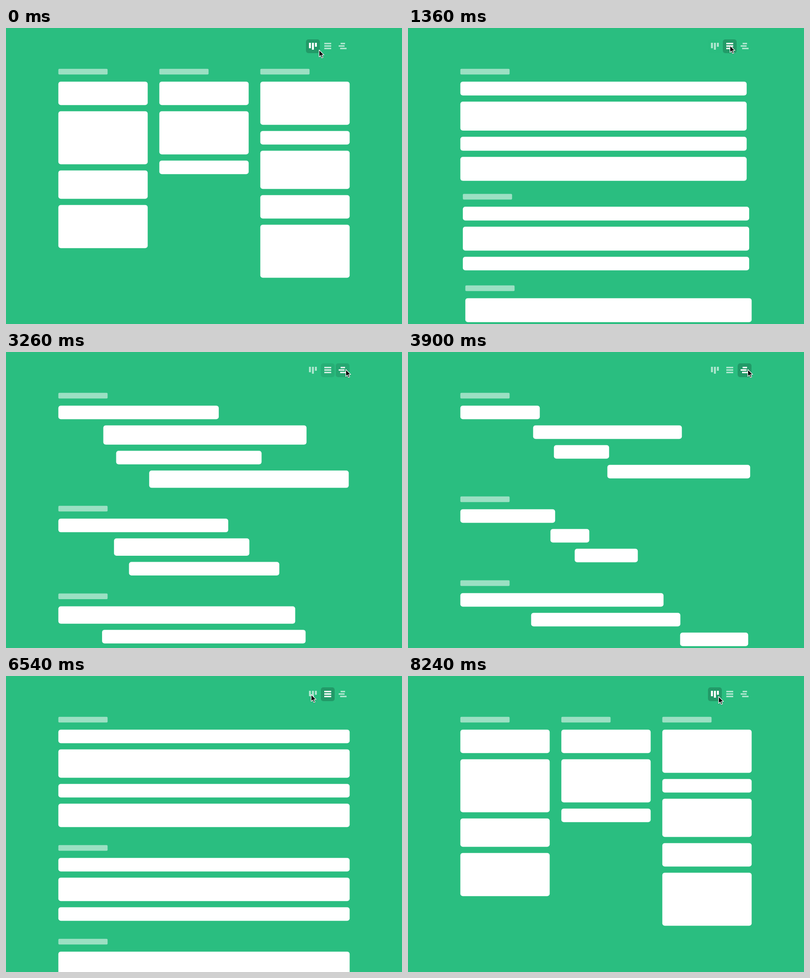
Recreate the animation shown at these times as an HTML page. Size 800 by 600 pixels, loop 8.26 s.

```html
<!DOCTYPE html>
<html lang="en">
<head>
<meta charset="utf-8">
<title>Layout switcher</title>
<style>
  html, body { margin: 0; width: 100%; height: 100%; overflow: hidden; background: #2abe80; }
  svg { display: block; width: 800px; height: 600px; }
</style>
</head>
<body>
<svg id="stage" viewBox="0 0 800 600" xmlns="http://www.w3.org/2000/svg"></svg>
<script>
const LOOP = 8260, MOVE = 800;
const LEFT = 106, TOP = 83, FULL = 588, COLUMN = 180, GUTTER = 24, GAP = 13, LINE = 27;
const SOFT = 0.25; // soft edge around every box
const BOARD = 0, LIST = 1, GANTT = 2;

// Cards: height on the board, then start and length on the timeline
const groups = [
  [[47, 0, 160], [107, 147, 300], [57, 189, 111], [87, 297, 288]],
  [[47, 0, 191], [87, 182, 78], [27, 231, 127]],
  [[87, 0, 410], [27, 143, 301], [77, 444, 137], [47], [107]]
];

// The pointer leaves, arrives near a button, then clicks it
const clicks = [
  { leave: 0, arrive: 340, at: 877, to: LIST, x: 650, y: 35 },
  { leave: 1940, arrive: 2540, at: 3089, to: GANTT, x: 686, y: 35 },
  { leave: 4480, arrive: 5080, at: 5291, to: LIST, x: 652, y: 37 },
  { leave: 6020, arrive: 6540, at: 6585, to: BOARD, x: 620, y: 37 }
];
const home = { x: 632, y: 44 }, OVERSHOOT = 4, RETURN = 7820;

const stage = document.getElementById('stage');

function add(tag, attrs, parent = stage) {
  const el = document.createElementNS('http://www.w3.org/2000/svg', tag);
  for (const k in attrs) el.setAttribute(k, attrs[k]);
  parent.appendChild(el);
  return el;
}

function place(el, [x, y, width, height], grow = 0) {
  const box = { x: x - grow, y: y - grow, width: width + 2 * grow, height: height + 2 * grow };
  for (const k in box) el.setAttribute(k, box[k].toFixed(2));
}

function rect(box, attrs, parent) {
  const el = add('rect', attrs, parent);
  place(el, box);
  return el;
}

const clamp = x => Math.max(0, Math.min(1, x));
const mix = (a, b, p) => a + (b - a) * p;
const easeOut = x => 1 - Math.pow(1 - x, 4);
const smooth = x => x * x * (3 - 2 * x);
const span = (t, a, b) => clamp((t - a) / (b - a));

// Wider cards need fewer lines
const listHeight = h => LINE + 10 * Math.max(0, Math.floor((h - 47) / 20));

// Boxes for every label and card in one view
function layout(view) {
  const boxes = [];
  let y = TOP;
  groups.forEach((cards, col) => {
    const x = view === BOARD ? LEFT + col * (COLUMN + GUTTER) : LEFT;
    if (view === BOARD) y = TOP;
    boxes.push([x, y, 99, 11]);
    y += 26;
    for (const [tall, start = 0, length = COLUMN] of cards) {
      const h = [tall, listHeight(tall), LINE][view];
      boxes.push([
        view === GANTT ? LEFT + start : x, y,
        [COLUMN, FULL, length][view], h
      ]);
      y += h + GAP;
    }
    y += GUTTER;
  });
  return boxes;
}

const layouts = [BOARD, LIST, GANTT].map(layout);

rect([0, 0, 800, 600], { fill: '#2abe80' });

const shapes = groups.flatMap(cards => [
  add('rect', { rx: 2, fill: '#fff', 'fill-opacity': 0.53 }),
  ...cards.map(() => add('rect', { rx: 5, fill: '#fff' }))
]);

// Bar number i of each icon
const icons = [
  i => [612 + 6 * i, 30, 4, [11, 14, 8][i]],
  i => [643, 30 + 5 * i, 14, 3],
  i => [[676, 672, 675][i], 30 + 5 * i, [9, 12, 13][i], 3]
];

const buttons = icons.map((bar, n) => {
  const back = rect([606 + 30 * n, 23, 28, 28], { rx: 5 });
  const icon = add('g', { fill: '#fff' });
  for (let i = 0; i < 3; i++) rect(bar(i), {}, icon);
  return { back, icon };
});

const pointer = add('g', {});
const arrow = 'M.5 .5V14.6L3.7 11.6L5.9 16.8L8.3 15.8L6.1 10.7H10.4Z';
add('path', { d: arrow, transform: 'translate(0 .8)', opacity: 0.15,
  stroke: '#000', 'stroke-width': 1.6 }, pointer);
add('path', { d: arrow, stroke: '#fff', 'stroke-width': 1.1,
  'stroke-linejoin': 'round' }, pointer);

function viewAt(t) {
  let from = BOARD, to = BOARD, p = 1;
  for (const click of clicks) {
    if (t < click.at) break;
    from = to;
    to = click.to;
    p = easeOut(span(t, click.at, click.at + MOVE));
  }
  return [from, to, p];
}

// Each move runs a little past its button and settles before the click
function pointerAt(t) {
  let { x, y } = home;
  for (const c of clicks) {
    if (t < c.leave) break;
    const past = c.x + OVERSHOOT * Math.sign(c.x - x);
    const go = smooth(span(t, c.leave, c.arrive));
    const settle = smooth(span(t, Math.max(c.arrive, c.at - 300), c.at));
    x = mix(mix(x, past, go), c.x, settle);
    y = mix(y, c.y, go);
  }
  const back = Math.pow(span(t, RETURN, LOOP), 12);
  return [mix(x, home.x, back), mix(y, home.y, back)];
}

function draw(t) {
  const [from, to, p] = viewAt(t);
  shapes.forEach((el, i) => {
    place(el, layouts[from][i].map((v, k) => mix(v, layouts[to][i][k], p)), SOFT);
  });
  buttons.forEach(({ back, icon }, i) => {
    const on = mix(+(i === from), +(i === to), p);
    back.setAttribute('opacity', 0.19 * on);
    icon.setAttribute('opacity', mix(0.6, 1, on));
  });
  const [x, y] = pointerAt(t).map(Math.round);
  pointer.setAttribute('transform', `translate(${x} ${y})`);
}

let origin = null;
function tick(now) {
  if (origin === null) origin = now;
  draw((now - origin) % LOOP);
  requestAnimationFrame(tick);
}
draw(0);
requestAnimationFrame(tick);
</script>
</body>
</html>
```
